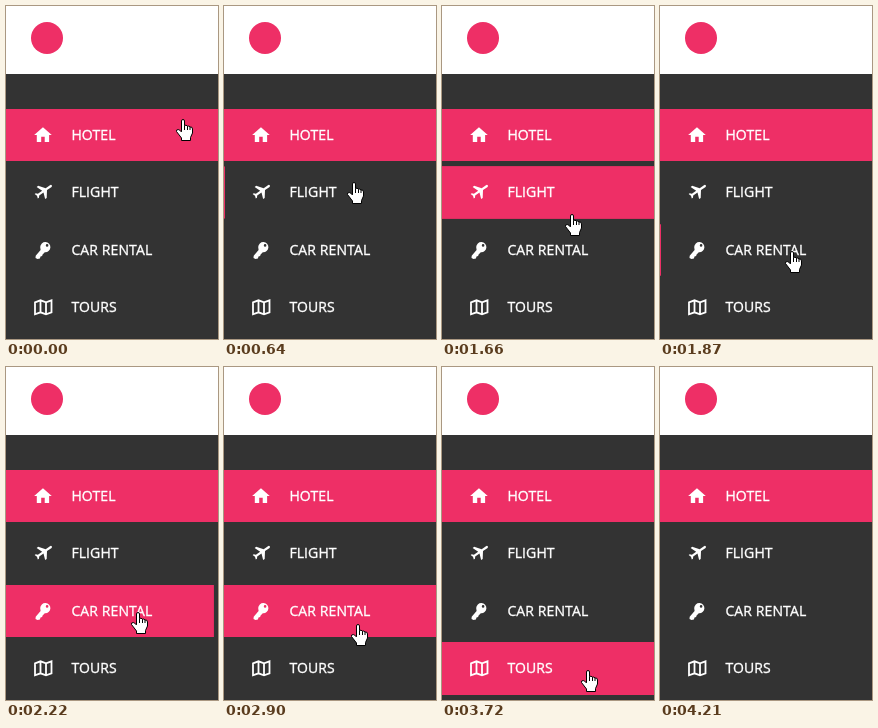
An HTML page for the animation above (4.6 s loop, 212 px wide and 333 px high).

```html
<!DOCTYPE html>
<html lang="en">
<head>
<meta charset="utf-8">
<title>Menu hover</title>
<style>
  html, body { margin: 0; height: 100%; overflow: hidden; background: #333; }
  svg { display: block; width: 212px; height: 333px; }
  text { font: 14px "Open Sans", sans-serif; letter-spacing: .1px; fill: #fff; stroke: #fff; stroke-width: .35; }
  .pink { fill: #ee2f66; }
  .icon { fill: #fff; }
  .line { fill: none; stroke: #fff; stroke-width: 1.8; }
</style>
</head>
<body>
<svg viewBox="0 0 212 333">
  <rect width="212" height="333" fill="#333"/>
  <rect width="212" height="68" fill="#fff"/>
  <circle class="pink" cx="41" cy="32" r="16"/>
  <rect class="pink" y="103" width="212" height="52"/>
  <rect class="pink bar"/>
  <rect class="pink bar"/>
  <rect class="pink bar"/>

  <path class="icon" transform="translate(26.4 118.5) scale(.88)" d="M10 20v-6h4v6h5v-8h3L12 3 2 12h3v8z"/>
  <path class="icon" transform="translate(38 184.8) rotate(55) scale(.78 .95) translate(-11.5 -12)"
    d="M21 16v-2l-8-5V3.5a1.5 1.5 0 0 0-3 0V9l-8 5v2l8-2.5V19l-2 1.5V22l3.5-1 3.5 1v-1.5L13 19v-5.5z"/>
  <path class="icon" fill-rule="evenodd"
    d="M34.2 241a5.1 5.1 0 1 1 4.6 5.2l-2.2 2.2-.5 1.7-1.6.4-.6 1.9-2.4.6-2-1 .2-2.2 4.9-5.8zM39.8 239.4a1.3 1.3 0 1 0 2.6 0a1.3 1.3 0 1 0-2.6 0z"/>
  <path class="line" d="M29 296.3l5.5-2 5.5 2 5.5-2v12l-5.5 2-5.5-2-5.5 2zM34.5 294.3v12M40 296.3v12"/>

  <text x="65.4" y="134">HOTEL</text>
  <text x="65.4" y="191">FLIGHT</text>
  <text x="65.4" y="249">CAR RENTAL</text>
  <text x="65.4" y="306">TOURS</text>

  <g id="hand" fill="#fff" stroke="#000">
    <path d="M5.5 12.5V2Q5.5.5 7 .5T8.5 2V6.5Q10 5.5 11.5 7.2 13 6.5 14 8 16.5 7.5 16.5 10V14L14.5 18.5V21.5H5.5V19L.5 12.5Q0 10.5 2.2 10.5 3.5 10.5 5.5 13z"/>
    <path d="M8.5 6.5V11M11.5 7.2V11M14 8V11"/>
  </g>
</svg>
<script>
const LOOP = 4600, STEP = 68.7, OFFSET = 8, WIDTH = 212, HIDE = 3920;
const bars = document.querySelectorAll('.bar');
const hand = document.getElementById('hand');

// Pointer enters and leaves each item below the active one
const hovers = [[460, 1655], [1690, 3000], [3050, 3950]];

// Pointer path: time, x, y
const path = [
  [0, 170, 113], [640, 122, 177], [1540, 122, 177], [1800, 125, 245], [2835, 125, 245],
  [2893, 127, 257], [3306, 131, 293], [3718, 139, 303], [HIDE, 149, 333]
];

const clamp = v => Math.min(1, Math.max(0, v));

function bezier(x1, y1, x2, y2) {
  const at = (a, b, s) => 3 * (1 - s) * s * ((1 - s) * a + s * b) + s ** 3;
  return x => {
    x = clamp(x);
    if (x === 0 || x === 1) return x;
    let low = 0, high = 1;
    for (let i = 0; i < 24; i++) {
      const mid = (low + high) / 2;
      if (at(x1, x2, mid) < x) low = mid; else high = mid;
    }
    return at(y1, y2, low);
  };
}
const ease = bezier(.25, .1, .25, 1);
const snap = bezier(1, 0, 0, 1);

function drawBar(bar, i, t) {
  const [enter, leave] = hovers[i];
  const top = Math.round(160.4 + 57.4 * i), full = Math.round(212.8 + 57.4 * i) - top;
  const height = full * (ease((t - enter) / 200) - ease((t - leave) / 200));
  bar.setAttribute('y', top + (full - height) / 2);
  bar.setAttribute('height', Math.max(0, height));
  bar.setAttribute('width', 1 + (WIDTH - 1) * snap((t - enter - 200) / 400));
}

function drawHand(t) {
  hand.style.display = t < HIDE ? '' : 'none';
  const next = Math.max(1, path.findIndex(p => p[0] > t));
  const [t0, x0, y0] = path[next - 1], [t1, x1, y1] = path[next];
  const k = clamp((t - t0) / (t1 - t0));
  hand.setAttribute('transform', `translate(${Math.round(x0 + (x1 - x0) * k)} ${Math.round(y0 + (y1 - y0) * k)})`);
}

const start = performance.now();
function frame() {
  const time = (performance.now() - start) % LOOP;
  const t = Math.max(0, Math.floor((time - OFFSET) / STEP) * STEP + OFFSET);
  bars.forEach((bar, i) => drawBar(bar, i, t));
  drawHand(t);
  requestAnimationFrame(frame);
}
frame();
</script>
</body>
</html>
```
